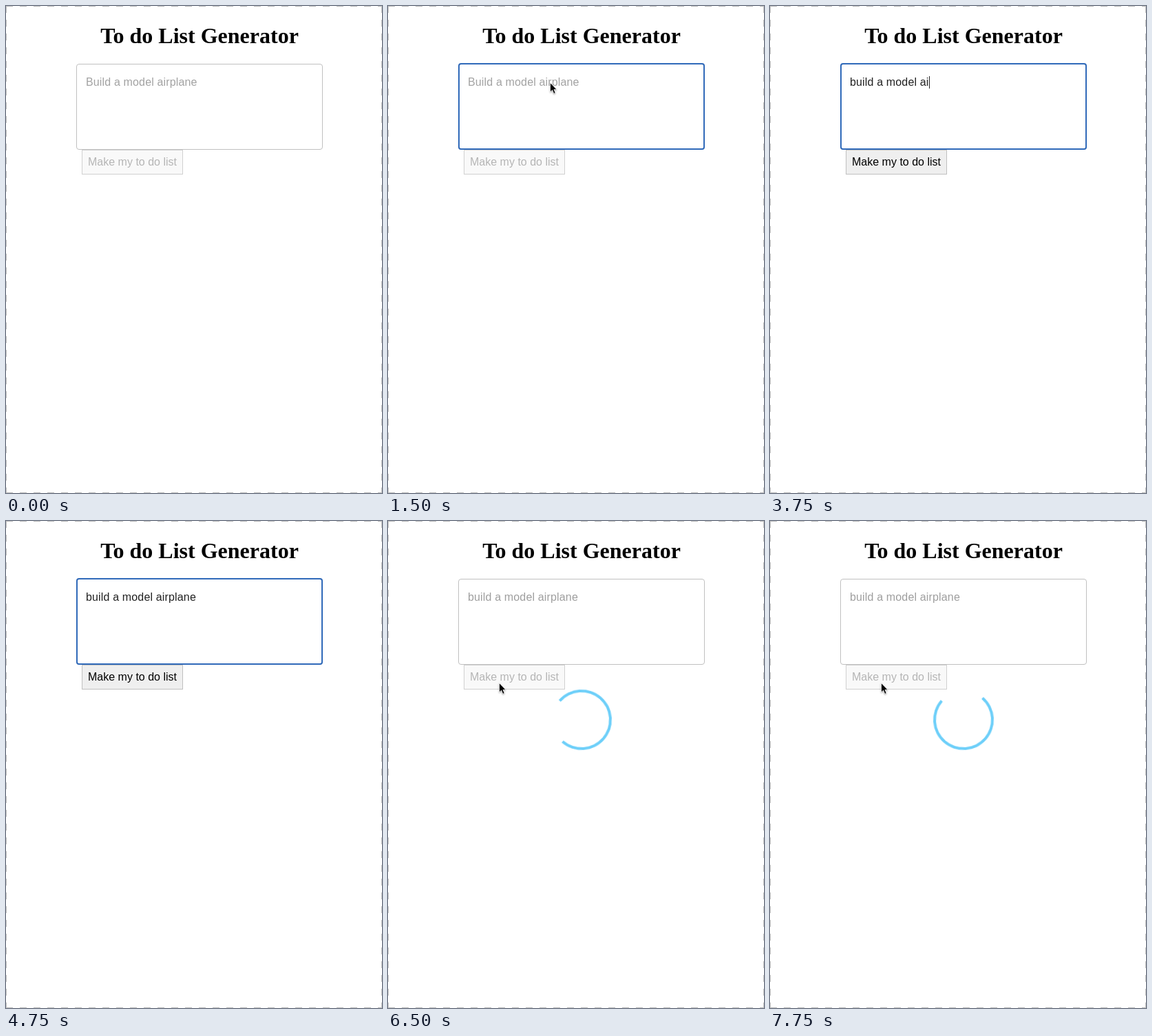
Write an HTML page that moves like this. It is 546 by 708 pixels and loops after 8000 ms.

```html
<!DOCTYPE html>
<html lang="en">
<head>
<meta charset="utf-8">
<title>To do List Generator</title>
<style>
html, body { margin: 0; width: 100%; height: 100%; overflow: hidden; background: #fff; }
.stage { position: relative; width: 546px; height: 708px; font: 16px/18px "Liberation Sans", Arial, sans-serif; }
.stage > * { position: absolute; box-sizing: border-box; white-space: pre; }
.frame { left: 0; top: 0; }
h1 { margin: 0; left: 102px; top: 25px; width: 358px; text-align: center; font: bold 32px/37px "Liberation Serif", "Times New Roman", serif; }

/* Every state is held and switches hard on a quarter second grid. */
.field, .focus, .hint, .typed, .caret, .blink, button, .wait, .cursor { animation: 8s step-end infinite; }
.field { left: 102px; top: 84px; width: 358px; height: 125px; border: 1px solid #c0c0c0; border-radius: 4px; }
.focus { left: 102px; top: 83px; width: 358px; height: 126px; border: 2px solid #2f69b9; border-radius: 4px; animation-name: focus; }
.hint, .typed { left: 116px; top: 102px; letter-spacing: .00938em; }
.hint { color: #a2a2a2; animation-name: hint; }
.typed { color: #212121; animation-name: typed; }
.typed b { font-weight: 400; font-size: 0; animation: key 8s step-end calc(var(--n) * 250ms) infinite; }
.caret, .blink { width: 1px; height: 18px; background: #222; }
.caret { display: inline-block; vertical-align: top; animation-name: caret; }
.blink { left: 116px; top: 103px; animation-name: blink; }
button { left: 110px; top: 209px; width: 147px; height: 36px; margin: 0; padding: 0; border: 1px solid #d0d0d0; background: #f9f9f9; color: #b5b5b5; font: inherit; animation-name: ready; }
.wait { left: 237px; top: 245px; width: 88px; height: 88px; animation-name: wait; }
.wait i { display: block; box-sizing: border-box; height: 100%; border: 4px solid #6dcff9; border-top-color: transparent; border-radius: 50%; animation: spin 1s steps(4) infinite; }
.cursor { left: 0; top: 0; overflow: visible; filter: drop-shadow(0 1px 1px rgba(0, 0, 0, .35)); animation-name: move; }

@keyframes focus { 0%, 71.875%, to { opacity: 0 } 15.625% { opacity: 1 } }
@keyframes hint { 0%, to { opacity: 1 } 31.25% { opacity: 0 } }
@keyframes typed { 0%, to { opacity: 0; color: #212121 } 31.25% { opacity: 1; color: #212121 } 75% { opacity: 1; color: #9e9e9e } }
@keyframes key { 0%, to { font-size: 0 } 31.25% { font-size: 16px } }
@keyframes caret { 0%, 65.625% { opacity: 1 } 59.375%, 71.875%, to { opacity: 0 } }
@keyframes blink { 0%, 18.75%, 31.25%, to { opacity: 0 } 15.625%, 25% { opacity: 1 } }
@keyframes ready {
  0%, 75%, to { background: #f9f9f9; color: #b5b5b5; border-color: #d0d0d0 }
  31.25% { background: #efefef; color: #000; border-color: #c0c0c0 }
}
@keyframes wait { 0%, to { opacity: 0 } 75% { opacity: 1 } }
@keyframes spin { from { transform: rotate(86deg) } to { transform: rotate(446deg) } }
@keyframes move {
  0%, to { opacity: 0; transform: translate(262px, 148px) }
  6.25% { opacity: 1; transform: translate(262px, 148px) }
  9.375% { opacity: 1; transform: translate(242px, 121px) }
  12.5% { opacity: 1; transform: translate(235px, 111px) }
  31.25% { opacity: 0; transform: translate(235px, 111px) }
  65.625% { opacity: 1; transform: translate(205px, 160px) }
  68.75% { opacity: 1; transform: translate(166px, 226px) }
  71.875% { opacity: 1; transform: translate(161px, 235px) }
}
</style>
</head>
<body>
<div class="stage">
  <svg class="frame" width="546" height="708" fill="none" stroke="#bdbdbd" stroke-dasharray="10 10">
    <path d="M0 .5H546M0 707.5H546M.5 0V708M545.5 0V708"/>
  </svg>
  <h1>To do List Generator</h1>
  <div class="field"></div>
  <div class="focus"></div>
  <div class="hint">Build a model airplane</div>
  <div class="typed"><b style="--n:0">bui</b><b style="--n:1">ld</b><b style="--n:2"> a</b><b style="--n:3"> mo</b><b style="--n:4">del</b><b style="--n:5"> ai</b><b style="--n:6">rp</b><b style="--n:7">la</b><b style="--n:8">ne</b><span class="caret"></span></div>
  <div class="blink"></div>
  <button type="button" tabindex="-1">Make my to do list</button>
  <div class="wait"><i></i></div>
  <svg class="cursor" width="12" height="18">
    <path d="M.5 .5V14L3.6 11.2L5.8 16.4L8.2 15.4L6 10.4H10Z" fill="#000" stroke="#fff" stroke-width=".8"/>
  </svg>
</div>
</body>
</html>
```
